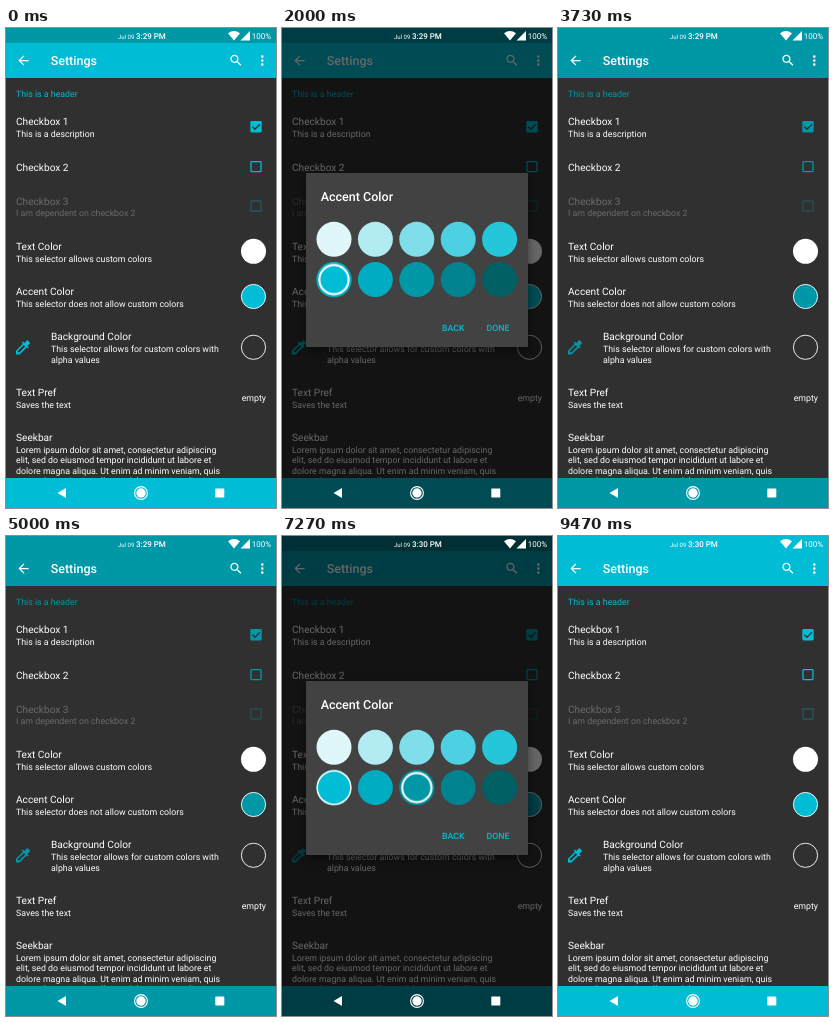
These frames come from a looping animation (270 px wide and 480 px high, 9540 ms). An HTML page:

```html
<!DOCTYPE html>
<html lang="en">
<head>
<meta charset="utf-8">
<title>Settings color picker</title>
<style>
html, body { margin: 0; width: 100%; height: 100%; overflow: hidden; background: #303030; }
svg { display: block; width: 270px; height: 480px; }
text { font: 8.8px Roboto, "Noto Sans", sans-serif; fill: #fff; text-rendering: geometricPrecision; white-space: pre; }
.title { font-size: 10.15px; }
.bold { font-size: 12.5px; font-weight: 500; }
.clock { font-size: 8px; font-weight: 500; }
.date { font-size: 6px; }
.level { font-size: 8px; }
.btn { font-weight: 500; }
.sub .btn { fill: #00bcd4; }
.end { text-anchor: end; }
.off { opacity: .28; }
.accent, .grid .btn { fill: var(--accent); }
.box { fill: none; stroke: var(--accent); stroke-width: 1.3; }
.white { fill: #fff; }
.line { fill: none; stroke: #fff; }

/* One loop: 1% = 95.4 ms */
svg, .bar, .tools, .dim, .row, .dialog, .grid, .sub, .early, .late, .pick5, .pick7, .press5, .press7 {
  animation: 9540ms linear infinite;
}
svg { animation-name: accent; animation-timing-function: step-end; }
.bar { animation-name: bar; animation-timing-function: step-end; }
.tools { animation-name: tools; }
.dim { animation-name: dim; }
.row { animation-name: row; }
.dialog { animation-name: dialog; filter: drop-shadow(0 4px 5px rgba(0, 0, 0, .45)); }
.grid, .sub, .early, .late, .pick5, .pick7, .press5, .press7 { animation-timing-function: step-end; }
.grid { animation-name: grid; }
.sub { animation-name: sub; }
.early { animation-name: early; }
.late { animation-name: late; }
.pick5 { animation-name: pick5; }
.pick7 { animation-name: pick7; }
.press5 { animation-name: press5; }
.press7 { animation-name: press7; }

@keyframes accent {
  0%, 83.333%, 100% { --accent: #00bcd4; }
  33.648% { --accent: #0097a7; }
}
@keyframes bar {
  0% { fill: #0097a7; }
  61.845% { fill: #007986; }
  83.333%, 100% { fill: #00bcd4; }
}
/* The toolbar follows the accent a little later */
@keyframes tools {
  0%, 34.906%, 88.784%, 100% { fill: #00bcd4; }
  39.099%, 84.591% { fill: #0097a7; }
}
@keyframes dim {
  0%, 6.289%, 36.583%, 61.845%, 86.268%, 100% { opacity: 0; }
  8.386%, 33.648%, 63.941%, 83.333% { opacity: .6; }
}
@keyframes dialog {
  0%, 35.22%, 84.906%, 100% { opacity: 0; }
  6.289%, 61.845% { opacity: 0; animation-timing-function: cubic-bezier(0, 0, .3, 1); }
  7.862%, 33.648%, 63.417%, 83.333% { opacity: 1; }
}
@keyframes row {
  0%, 5.346%, 9.958%, 60.901%, 65.514%, 100% { opacity: 0; }
  6.289%, 7.547%, 61.845%, 63.417% { opacity: .22; }
}
@keyframes grid {
  0%, 52.411%, 100% { visibility: visible; }
  13.627%, 68.658% { visibility: hidden; }
}
@keyframes sub {
  0%, 52.411%, 100% { visibility: hidden; }
  13.627%, 68.658% { visibility: visible; }
}
@keyframes early { 0% { opacity: 1; } 56.604%, 100% { opacity: 0; } }
@keyframes late { 0% { opacity: 0; } 56.604%, 100% { opacity: 1; } }
@keyframes pick5 { 0%, 77.568%, 100% { opacity: 1; } 27.254% { opacity: 0; } }
@keyframes pick7 { 0%, 77.568%, 100% { opacity: 0; } 27.254% { opacity: 1; } }
@keyframes press5 { 0%, 77.568%, 100% { opacity: 0; } 75.472% { opacity: 1; } }
@keyframes press7 { 0%, 27.254%, 100% { opacity: 0; } 25.681% { opacity: 1; } }
</style>
</head>
<body>
<svg viewBox="0 0 270 480">
  <rect width="270" height="480" fill="#303030"/>

  <!-- Settings list -->
  <rect class="row white" y="246" width="270" height="45"/>
  <text class="accent" x="10" y="69.3">This is a header</text>

  <text class="title" x="10" y="97">Checkbox 1</text>
  <text x="10" y="109">This is a description</text>
  <rect class="accent" x="244.3" y="93" width="11.4" height="11.4" rx="1.3"/>
  <path d="M246.4 98.8l2.5 2.5 5-5" fill="none" stroke="#303030" stroke-width="1.3"/>

  <text class="title" x="10" y="142.7">Checkbox 2</text>
  <rect class="box" x="245" y="133.6" width="10" height="10" rx=".8"/>

  <g class="off">
    <text class="title" x="10" y="176.6">Checkbox 3</text>
    <text x="10" y="188.2">I am dependent on checkbox 2</text>
    <rect class="box" x="245" y="173" width="10" height="10" rx=".8"/>
  </g>

  <text class="title" x="10" y="221.6">Text Color</text>
  <text x="10" y="233.6">This selector allows custom colors</text>
  <circle class="white" cx="247.5" cy="223.3" r="12.5"/>

  <text class="title" x="10" y="267">Accent Color</text>
  <text x="10" y="279">This selector does not allow custom colors</text>
  <circle class="accent" cx="247.5" cy="268.5" r="12.1" stroke="#fff" stroke-width=".9"/>

  <path class="accent" transform="translate(7.6 310) scale(.78)" d="M20.71 5.63l-2.34-2.34c-.39-.39-1.02-.39-1.41 0l-3.12 3.12-1.93-1.91-1.41 1.41 1.42 1.42L3 16.25V21h4.75l8.92-8.92 1.42 1.42 1.41-1.41-1.92-1.92 3.12-3.12c.4-.4.4-1.03.01-1.42zM6.92 19L5 17.08l8.06-8.06 1.92 1.92L6.92 19z"/>
  <text class="title" x="45" y="312.4">Background Color</text>
  <text x="45" y="324.3">This selector allows for custom colors with</text>
  <text x="45" y="334.6">alpha values</text>
  <circle class="line" cx="247.5" cy="319.3" r="12.1" stroke-width=".9"/>

  <text class="title" x="10" y="367.6">Text Pref</text>
  <text x="10" y="380">Saves the text</text>
  <text class="end" x="260" y="373">empty</text>

  <text class="title" x="10" y="412.8">Seekbar</text>
  <text x="10" y="425">Lorem ipsum dolor sit amet, consectetur adipiscing</text>
  <text x="10" y="435.4">elit, sed do eiusmod tempor incididunt ut labore et</text>
  <text x="10" y="445.8">dolore magna aliqua. Ut enim ad minim veniam, quis</text>
  <text x="10" y="456.2">nostrud exercitation ullamco laboris nisi ut aliquip</text>

  <!-- Bars -->
  <rect class="tools" y="15" width="270" height="35"/>
  <rect class="bar" width="270" height="15"/>
  <rect class="accent" y="450" width="270" height="30"/>
  <path class="white" transform="translate(9.9 24.9) scale(.635)" d="M20 11H7.83l5.59-5.59L12 4l-8 8 8 8 1.41-1.41L7.83 13H20v-2z"/>
  <text class="bold" x="44.7" y="37.2">Settings</text>
  <path class="white" transform="translate(222.4 24.8) scale(.635)" d="M15.5 14h-.79l-.28-.27C15.41 12.59 16 11.11 16 9.5 16 5.91 13.09 3 9.5 3S3 5.91 3 9.5 5.91 16 9.5 16c1.61 0 3.09-.59 4.23-1.57l.27.28v.79l5 4.99L20.49 19l-4.99-5zm-6 0C7.01 14 5 11.99 5 9.5S7.01 5 9.5 5 14 7.01 14 9.5 11.99 14 9.5 14z"/>
  <path d="M256.3 28.6h0m0 4h0m0 4h0" class="line" stroke-width="2.6" stroke-linecap="round"/>

  <rect class="dim" width="270" height="480"/>

  <!-- System icons stay bright above the dim layer -->
  <text class="date" x="112" y="11">Jul 09</text>
  <text class="clock early" x="130" y="11">3:29 PM</text>
  <text class="clock late" x="130" y="11">3:30 PM</text>
  <path class="white" d="M222 5.3Q228 .8 234 5.3L228 12.5z"/>
  <path class="white" d="M244 3v9.5h-9.5z"/>
  <text class="level end" x="265.2" y="11">100%</text>
  <path class="white" d="M51.5 465l8.5-5v10z"/>
  <circle class="line" cx="135" cy="465" r="6.4" stroke-width="1.1"/>
  <circle class="white" cx="135" cy="465" r="4.7"/>
  <rect class="white" x="209.3" y="460.5" width="9" height="9" rx=".6"/>

  <!-- Color chooser -->
  <g class="dialog">
    <g class="grid">
      <rect x="24" y="106" width="222" height="254" rx="1.3" fill="#424242"/>
      <text class="bold" x="38.7" y="133.4">Accent Color</text>
      <g id="hues"></g>
      <text class="btn" x="153" y="342.3">CANCEL</text>
      <text class="btn" x="204.5" y="342.3">DONE</text>
    </g>
    <g class="sub">
      <rect x="24" y="145" width="222" height="174" rx="1.3" fill="#424242"/>
      <text class="bold" x="38.7" y="172.6">Accent Color</text>
      <g id="shades"></g>
      <text class="btn" x="160" y="302.8">BACK</text>
      <text class="btn" x="204.5" y="302.8">DONE</text>
    </g>
  </g>
</svg>
<script>
const hues = "f44336 e91e63 9c27b0 673ab7 3f51b5 2196f3 03a9f4 00bcd4 009688 4caf50 " +
  "8bc34a cddc39 ffeb3b ffc107 ff9800 ff5722 795548 9e9e9e 607d8b";
const shades = "e0f7fa b2ebf2 80deea 4dd0e1 26c6da 00bcd4 00acc1 0097a7 00838f 006064";

const disc = (r, fill, extra = "") => `<circle r="${r}" fill="${fill}" ${extra}/>`;

const ring = (color, cls) => `<g class="${cls}">` +
  disc(17.5, color) + disc(17.5, "#000", 'opacity=".1"') +
  disc(15.7, "#fff") + disc(13.6, color) + "</g>";

const press = cls => disc(16.8, "none", `class="${cls}" stroke="#fff" stroke-width="1.5"`);

// Lays swatches out five to a row; marks(i, color) adds overlays
function fill(id, list, top, marks) {
  document.getElementById(id).innerHTML = list.split(" ").map((hex, i) => {
    const color = "#" + hex;
    const x = 52 + (i % 5) * 41.4;
    const y = top + Math.floor(i / 5) * 40.3;
    return `<g transform="translate(${x} ${y})">${disc(17.5, color)}${marks(i, color)}</g>`;
  }).join("");
}

fill("hues", hues, 171.7, (i, color) => i === 7 ? ring(color, "") : "");
fill("shades", shades, 211.3, (i, color) =>
  i === 5 || i === 7 ? ring(color, "pick" + i) + press("press" + i) : "");
</script>
</body>
</html>
```
